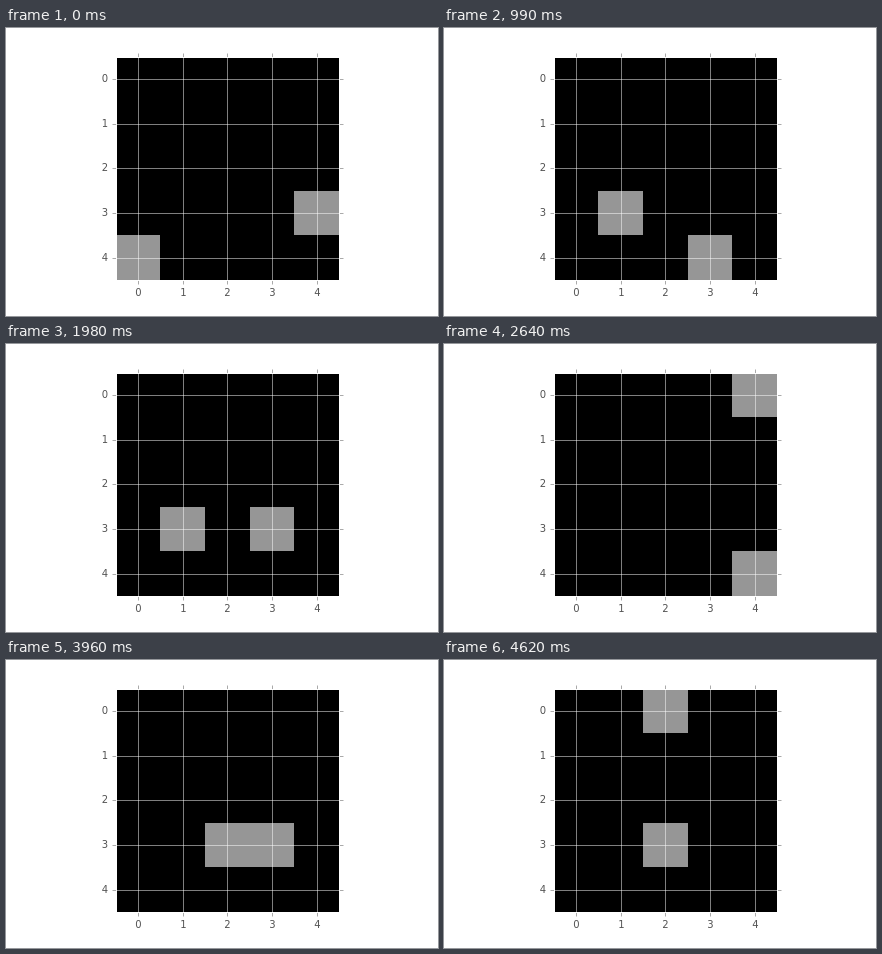
Recreate the animation shown at these times as an HTML page. Size 432 by 288 pixels, loop 4950 ms.

```html
<!DOCTYPE html>
<html lang="en">
<head>
<meta charset="utf-8">
<title>Two walkers on a grid</title>
<style>
  html, body { margin: 0; width: 100%; height: 100%; overflow: hidden; background: #fff; }
  svg { display: block; }
  text { font: 10px "DejaVu Sans", sans-serif; fill: #555; }
  .grid { stroke: #fff; stroke-width: .5; }
  .tick { stroke: #555; stroke-width: .5; }
  .spine { fill: none; stroke: #fff; }
</style>
</head>
<body>
<svg id="plot" width="432" height="288" viewBox="0 0 432 288">
  <rect x="110" y="29" width="223" height="223"/>
  <g id="cells"></g>
  <g id="axes"></g>
  <rect class="spine" x="110.5" y="29.5" width="223" height="223"/>
</svg>
<script>
const NS = 'http://www.w3.org/2000/svg';
const LEFT = 109.8, TOP = 28.8, CELL = 44.64, STEP = 330;
const axes = document.getElementById('axes');
const cells = document.getElementById('cells');

// Column and row of both walkers at each step
const path = [
  '43 04', '03 14', '02 23', '13 34', '12 23',
  '23 23', '13 33', '20 30', '40 44', '40 44',
  '40 41', '00 01', '23 33', '42 44', '20 23'
].map(s => s.split(' ').map(p => [+p[0], +p[1]]));

function add(parent, tag, attrs) {
  const el = document.createElementNS(NS, tag);
  for (const k in attrs) el.setAttribute(k, attrs[k]);
  return parent.appendChild(el);
}

function line(cls, x1, y1, x2, y2) {
  add(axes, 'line', { class: cls, x1, y1, x2, y2 });
}

function label(value, x, y, anchor) {
  add(axes, 'text', { x, y, 'text-anchor': anchor }).textContent = value;
}

for (let i = 0; i < 5; i++) {
  const x = Math.round(LEFT + (i + .5) * CELL) + .5;
  const y = Math.round(TOP + (i + .5) * CELL) + .5;
  line('grid', x, 29.5, x, 252.5);
  line('grid', 110.5, y, 333.5, y);
  line('tick', x, 25.5, x, 29.5);
  line('tick', x, 252.5, x, 256.5);
  line('tick', 106.5, y, 110.5, y);
  line('tick', 333.5, y, 337.5, y);
  label(i, x, 268, 'middle');
  label(i, 102, y + 2.5, 'end');
}

const walkers = [0, 1].map(() => add(cells, 'rect', {}));

function place(el, [col, row], fill) {
  const x = Math.round(LEFT + col * CELL), y = Math.round(TOP + row * CELL);
  el.setAttribute('x', x);
  el.setAttribute('y', y);
  el.setAttribute('width', Math.round(LEFT + (col + 1) * CELL) - x);
  el.setAttribute('height', Math.round(TOP + (row + 1) * CELL) - y);
  el.setAttribute('fill', fill);
}

const start = performance.now();
let shown = -1;

function draw() {
  const step = Math.floor((performance.now() - start) / STEP) % path.length;
  if (step !== shown) {
    shown = step;
    const [a, b] = path[step];
    // A shared cell counts double and turns white
    const fill = String(a) === String(b) ? '#fff' : '#969696';
    place(walkers[0], a, fill);
    place(walkers[1], b, fill);
  }
  requestAnimationFrame(draw);
}
draw();
</script>
</body>
</html>
```
